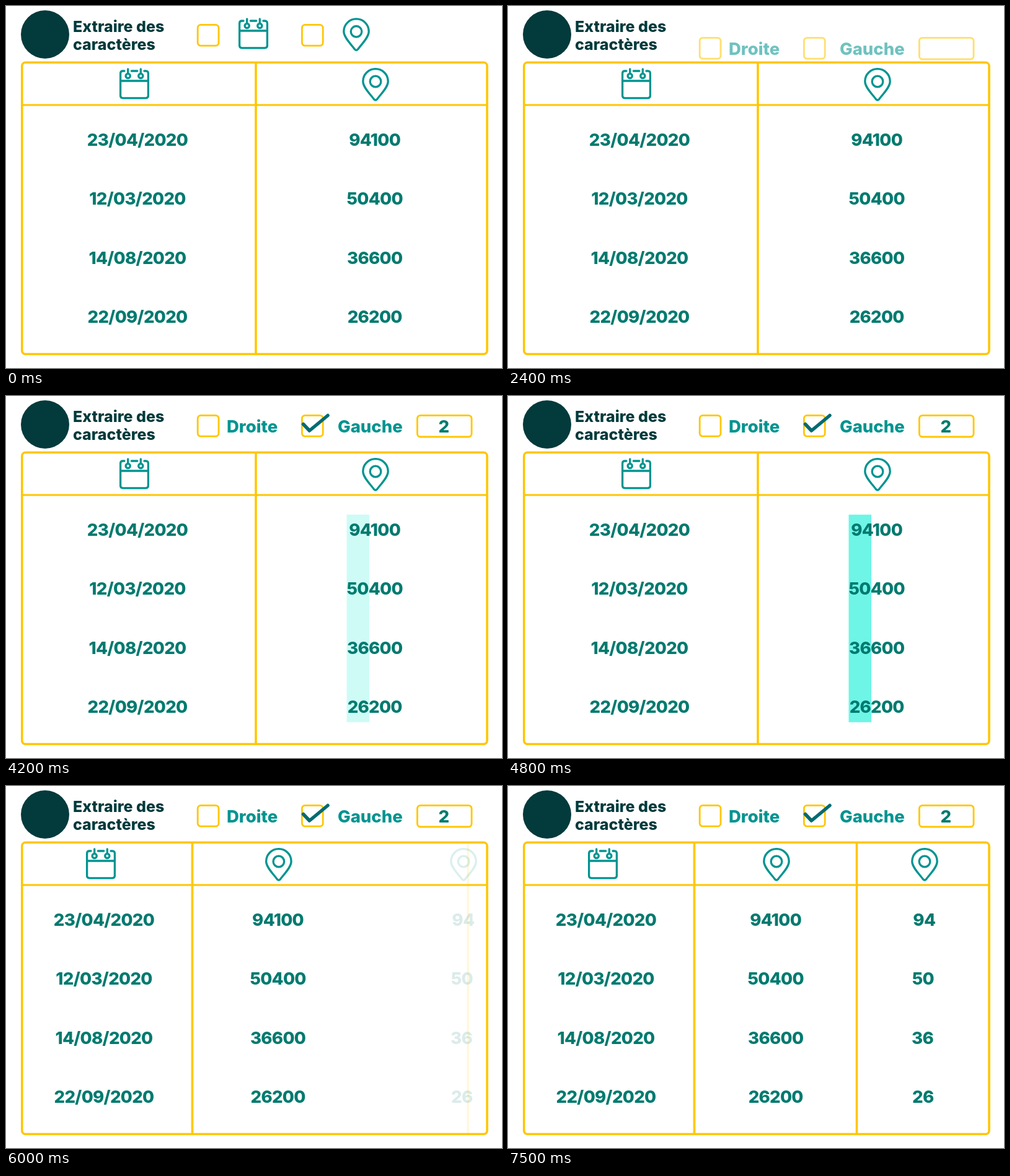
Recreate the animation shown at these times as an HTML page. Size 800 by 585 pixels, loop 7.7 s.

```html
<!DOCTYPE html>
<html lang="fr">
<head>
<meta charset="utf-8">
<title>Extraire des caractères</title>
<style>
  html, body { margin: 0; width: 100%; height: 100%; overflow: hidden; background: #fff; }
  svg { display: block; width: 800px; height: 585px; }
  text { font-family: Inter, "Open Sans", sans-serif; font-weight: 800; fill: currentColor; }
  .title { color: #003a3c; font-size: 25px; }
  .label { color: #009490; font-size: 27.5px; }
  .line, .icon, .check { fill: none; stroke: currentColor; }
  .line { --base: #ffc600; --half: #ffd24d; --peak: #ffde99; color: var(--base); stroke-width: 3.6; }
  .icon { --base: #009490; --half: #00a9a4; --peak: #00beb8; color: var(--base); stroke-width: 3.3; stroke-linecap: round; stroke-linejoin: round; }
  .cells { --base: #007a6f; --half: #00968b; --peak: #00b2a7; color: var(--base); font-size: 27.6px; letter-spacing: -.7px; text-anchor: middle; }
  .box { stroke-width: 2.8; }
  .check { color: #006b70; stroke-width: 5.5; stroke-linecap: round; stroke-linejoin: round; stroke-dasharray: 1 2; stroke-dashoffset: 1.01; }

  .old, .new, .check, .count, .mark, .dates, .codes, .extract, .split, .split2, .table .line, .table .icon, .table .cells {
    animation: 7.7s linear -5ms infinite both;
  }
  .old { animation-name: leave; }
  .new { animation-name: enter; }
  .old .check { animation-name: tickA; }
  .new .check { animation-name: tickB; }
  .count { animation-name: show; animation-timing-function: step-end; }
  .mark { animation-name: mark; }
  .dates { animation-name: dates; }
  .codes { animation-name: codes; }
  .extract { animation-name: extract; }
  .split { animation-name: split; }
  .split2 { animation-name: split2; }
  .table .line, .table .icon, .table .cells { animation-name: pulse; animation-timing-function: step-end; }

  @keyframes tickA {
    0%, 5.195% { stroke-dashoffset: 1.01; animation-timing-function: steps(3); }
    9.091%, 100% { stroke-dashoffset: 0; }
  }
  @keyframes leave {
    0%, 20.779% { transform: none; opacity: 1; animation-timing-function: steps(7); }
    29.87%, 100% { transform: translateY(-47px); opacity: 0; }
  }
  @keyframes enter {
    0%, 20.779% { transform: translateY(46.7px); opacity: 0; animation-timing-function: steps(14); }
    38.961%, 100% { transform: none; opacity: 1; }
  }
  @keyframes tickB {
    0%, 40.26% { stroke-dashoffset: 1.01; animation-timing-function: steps(4); }
    45.455%, 100% { stroke-dashoffset: 0; }
  }
  @keyframes show {
    0% { opacity: 0; }
    48.052%, 100% { opacity: 1; }
  }
  @keyframes mark {
    0%, 53.247% { opacity: 0; animation-timing-function: steps(5); }
    59.74% { opacity: 1; animation-timing-function: steps(5); }
    66.234%, 100% { opacity: 0; }
  }
  @keyframes dates {
    0%, 66.234% { transform: none; animation-timing-function: steps(7); }
    75.325%, 100% { transform: translateX(-54px); }
  }
  @keyframes split {
    0%, 66.234% { transform: none; animation-timing-function: steps(7); }
    75.325%, 100% { transform: translateX(-102.5px); }
  }
  @keyframes codes {
    0%, 66.234% { transform: none; animation-timing-function: steps(7); }
    75.325%, 76.623% { transform: translateX(-155px); animation-timing-function: steps(7); }
    85.714%, 100% { transform: translateX(-163px); }
  }
  @keyframes extract {
    0%, 76.623% { transform: translateX(77px); opacity: 0; animation-timing-function: steps(7); }
    85.714%, 100% { transform: none; opacity: 1; }
  }
  @keyframes split2 {
    0%, 76.623% { transform: translateX(213px); opacity: 0; animation-timing-function: steps(7); }
    85.714%, 100% { transform: none; opacity: 1; }
  }
  @keyframes pulse {
    0% { color: var(--base); }
    92.208% { color: var(--half); }
    93.506% { color: var(--peak); }
    96.104% { color: var(--half); }
    97.403%, 100% { color: var(--base); }
  }
</style>
</head>
<body>
<svg viewBox="0 0 800 585">
  <defs>
    <g id="calendar">
      <path d="M-16 5H-18.5Q-22.4 5-22.4 9V45Q-22.4 48.8-18.5 48.8H18.5Q22.4 48.8 22.4 45V9Q22.4 5 18.5 5H16M-4.6 5H4.8M-22.4 21H22.4M-10.3 2V9M10.3 2V9"/>
      <circle cx="-10.3" cy="13" r="3.6"/>
      <circle cx="10.3" cy="13" r="3.6"/>
    </g>
    <g id="pin">
      <path d="M-2.6 50.6C-7 44-20.2 32-20.2 21.8A20.2 20.2 0 0 1 20.2 21.8C20.2 32 7 44 2.6 50.6Q0 53.4-2.6 50.6Z"/>
      <circle cy="22" r="8.8"/>
    </g>
    <rect id="box" y="30.4" width="33.8" height="33.8" rx="5"/>
    <path id="tick" pathLength="1" d="M479.5 45.5L489.5 56L519 31.5"/>
    <clipPath id="bar"><path d="M0 0H800V89H0Z"/></clipPath>
  </defs>

  <circle cx="63" cy="46" r="39" fill="#033a3c"/>
  <g class="title">
    <text x="108" y="41.5">Extraire des</text>
    <text x="108" y="70.5">caractères</text>
  </g>

  <g clip-path="url(#bar)">
    <g class="old">
      <use href="#box" x="309.2" class="line box"/>
      <use href="#box" x="477.4" class="line box"/>
      <use href="#calendar" x="399" y="19" class="icon"/>
      <use href="#pin" x="565" y="19.3" class="icon"/>
      <use href="#tick" class="check"/>
    </g>
    <g class="new">
      <use href="#box" x="309.2" y="1" class="line box"/>
      <use href="#box" x="477.4" y="1" class="line box"/>
      <rect x="663.4" y="31.4" width="87.6" height="34.6" rx="5" class="line box"/>
      <text class="label" x="356" y="59.3">Droite</text>
      <text class="label" x="535" y="58.5">Gauche</text>
      <use href="#tick" class="check"/>
      <text class="cells count" x="706" y="59.3">2</text>
    </g>
  </g>

  <rect class="mark" x="549.5" y="191.7" width="36.5" height="335.5" fill="#0ff0d7"/>

  <g class="table">
    <g class="dates">
      <use href="#calendar" x="207" y="100" class="icon"/>
      <g class="cells">
        <text x="212" y="226">23/04/2020</text>
        <text x="212" y="321.3">12/03/2020</text>
        <text x="212" y="417.3">14/08/2020</text>
        <text x="212" y="512.4">22/09/2020</text>
      </g>
    </g>
    <g class="codes">
      <use href="#pin" x="596" y="100" class="icon"/>
      <g class="cells">
        <text x="594.7" y="226">94100</text>
        <text x="594.7" y="321.3">50400</text>
        <text x="594.7" y="417.3">36600</text>
        <text x="594.7" y="512.4">26200</text>
      </g>
    </g>
    <g class="split"><path class="line" d="M403 92V562"/></g>
    <g class="split2"><path class="line" d="M562.5 92V562"/></g>
    <g class="extract">
      <use href="#pin" x="672" y="100" class="icon"/>
      <g class="cells">
        <text x="671.3" y="226">94</text>
        <text x="669.3" y="321.3">50</text>
        <text x="668.5" y="417.3">36</text>
        <text x="669.3" y="512.4">26</text>
      </g>
    </g>
    <path class="line" style="stroke-width:3" d="M26 160H776"/>
    <rect class="line" x="25.8" y="91.3" width="750.2" height="471.2" rx="5.5"/>
  </g>
</svg>
</body>
</html>
```
